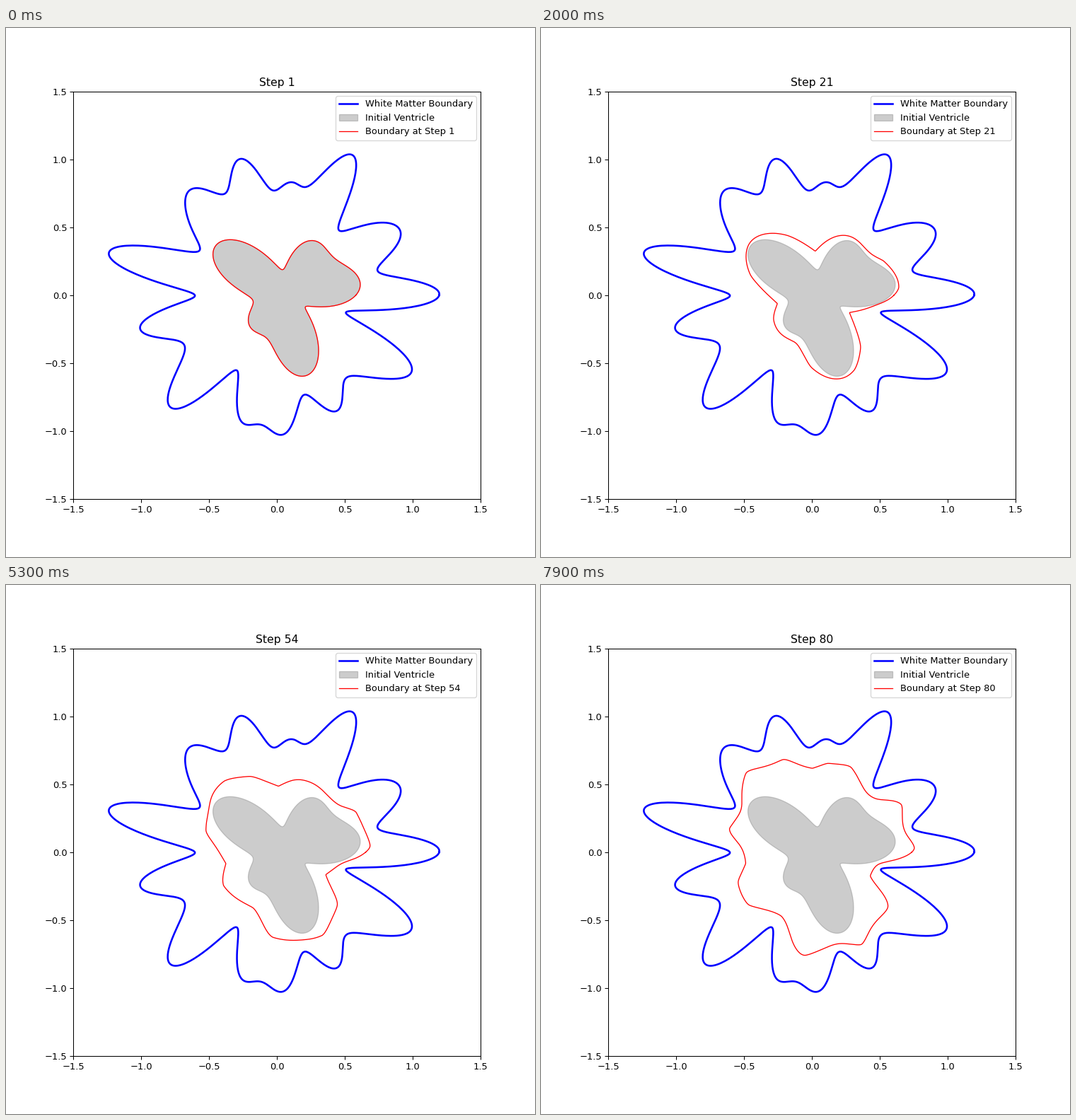
These frames come from a looping animation (748x748 px, 8 s). A matplotlib script:

```python
import numpy as np
import matplotlib.pyplot as plt
from matplotlib.animation import FuncAnimation

STEPS, SUBSTEPS, RAYS = 80, 8, 480
GAP = 0.03  # growth stops this close to the outer boundary


def matter(a):
    r = (0.9 + 0.15 * np.cos(11 * a) + 0.1 * np.cos(13 * a)
         + 0.1 * np.sin(7 * a) + 0.05 * np.cos(17 * a + 0.5))
    return r * np.cos(a), r * np.sin(a)


def ventricle(a):
    r = 0.4 + 0.15 * np.sin(3 * a) + 0.1 * np.cos(5 * a)
    return r * np.cos(a) + 0.08, r * np.sin(a)


def rate(step):
    """Growth eases off at first, then jumps to a faster pace."""
    return 0.026 if step >= 47 else 0.0085 + 0.005 * np.exp(-step / 8)


def grow(outer, inner):
    """Push the front along its normal, faster where there is more room."""
    angle = np.linspace(0, 2 * np.pi, RAYS, endpoint=False)
    ix, iy = inner
    r = np.interp(angle, np.arctan2(iy, ix), np.hypot(ix, iy), period=2 * np.pi)
    cell = 2 * np.pi / RAYS
    fronts = []
    for step in range(1, STEPS + 1):
        x, y = r * np.cos(angle), r * np.sin(angle)
        fronts.append((np.append(x, x[0]), np.append(y, y[0])))
        room = np.hypot(x[:, None] - outer[0], y[:, None] - outer[1]).min(axis=1)
        speed = rate(step) * np.maximum(room - GAP, 0)
        for _ in range(SUBSTEPS):
            ahead = np.maximum(np.roll(r, -1) - r, 0)
            behind = np.maximum(np.roll(r, 1) - r, 0)
            slope = np.hypot(ahead, behind) / (r * cell)
            r = r + speed / SUBSTEPS * np.sqrt(1 + slope**2)
    return fronts


theta = np.linspace(0, 2 * np.pi, 1000)
outer, inner = matter(theta), ventricle(theta)
fronts = grow(outer, inner)

fig, ax = plt.subplots(figsize=(8, 8), dpi=93.5)
ax.set_aspect("equal")
ax.set_xlim(-1.5, 1.5)
ax.set_ylim(-1.5, 1.5)

ax.plot(*outer, color="blue", lw=2, label="White Matter Boundary")
ax.fill(*inner, color="gray", alpha=0.4, label="Initial Ventricle")
front, = ax.plot([], [], color="red", lw=1, label="Boundary at Step 1")
title = ax.set_title("Step 1")
caption = ax.legend(loc="upper right").get_texts()[2]


def update(frame):
    step = frame + 1
    front.set_data(*fronts[frame])
    title.set_text(f"Step {step}")
    caption.set_text(f"Boundary at Step {step}")
    return front, title, caption


anim = FuncAnimation(fig, update, frames=STEPS, interval=100,
                     repeat=True, repeat_delay=0, blit=False)
plt.show()
```
